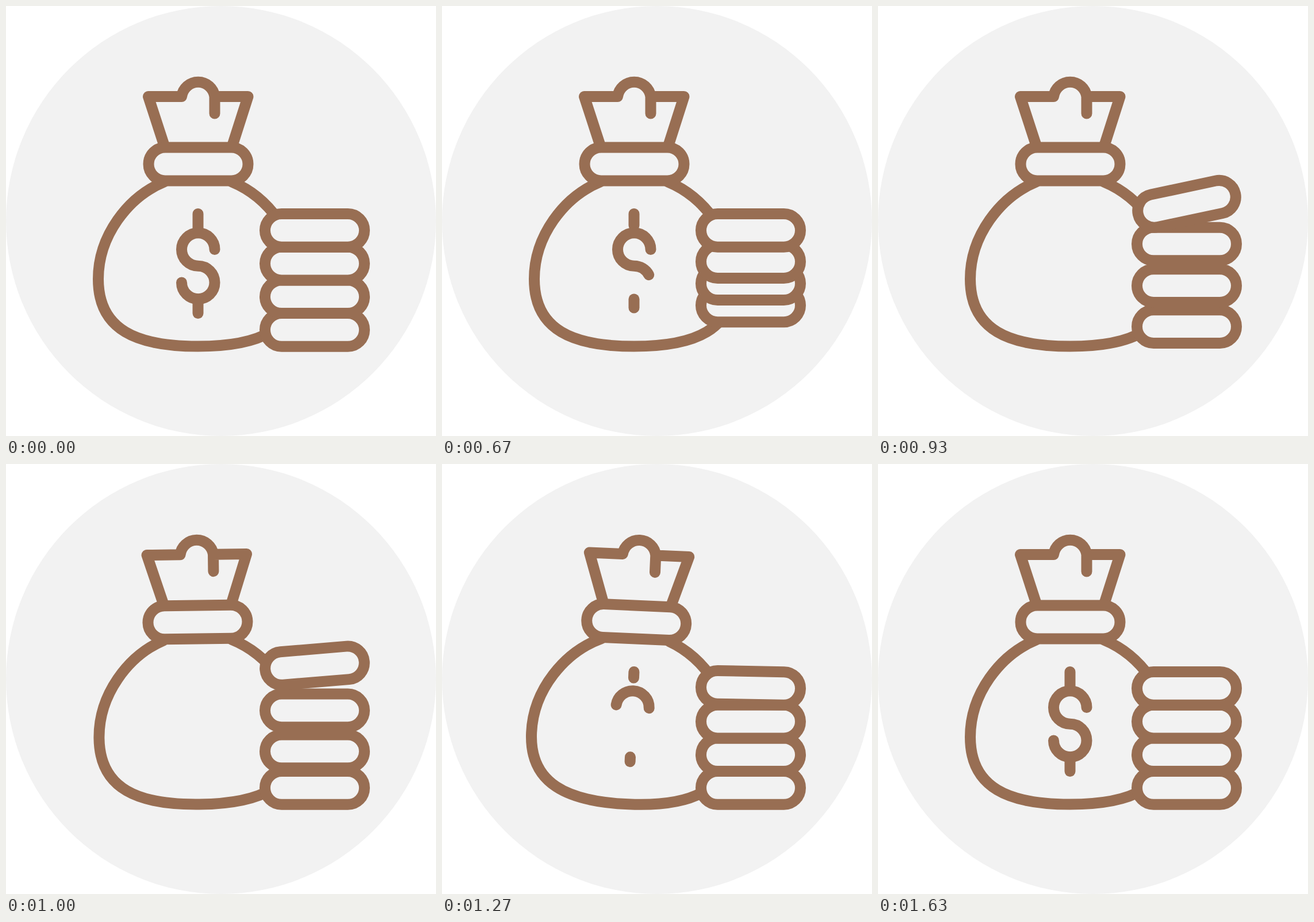
An HTML page that plays this animation: 748x748 px, repeating every 2.5 s.

```html
<!DOCTYPE html>
<html>
<head>
<meta charset="utf-8">
<style>
  html, body { margin: 0; width: 100%; height: 100%; overflow: hidden; background: #fff; }
  svg { display: block; width: 100vw; height: 100vh; }
  .line { fill: none; stroke: #986e53; stroke-width: 19; stroke-linecap: round; stroke-linejoin: round; }
  .disc, .solid { fill: #f2f2f2; }
</style>
</head>
<body>
<svg viewBox="0 0 748 748">
  <circle class="disc" cx="374" cy="374" r="374"/>
  <g class="line">
    <g id="bag">
      <path d="M275 306C212 332 160.500 400 160.500 475C160.500 564 228 592 334 592S507.500 564 507.500 475C507.500 400 456 332 393 306"/>
      <path d="M275 242L247.500 157.500H305.500A29 29 0 0 1 363 157.500V187M363 157.500H421L394 242"/>
      <rect class="solid" x="248" y="246" width="173" height="58" rx="29"/>
      <g id="dollar">
        <path pathLength="1" d="M334 361.500V394.500"/>
        <path pathLength="1" d="M363 423.500A28.750 28.750 0 1 0 334.250 452.250A28.750 28.750 0 1 1 305.500 481"/>
        <path pathLength="1" d="M334 510V534.500"/>
      </g>
    </g>
    <g id="coins"></g>
  </g>
</svg>
<script>
const LOOP = 2500, FRAME = 100 / 3;
const byId = id => document.getElementById(id);
const bag = byId('bag'), dollar = byId('dollar'), coinStack = byId('coins');

// Coins run from the bottom of the stack to the top.
const coins = [3, 2, 1, 0].map(row => {
  const coin = document.createElementNS('http://www.w3.org/2000/svg', 'rect');
  const attrs = { class: 'solid', x: 450.5, y: 361.5 + row * 57.7, width: 173, height: 57.7, rx: 28.85 };
  for (const name in attrs) coin.setAttribute(name, attrs[name]);
  return coinStack.appendChild(coin);
});

const linear = x => x;
const smooth = x => x * x * (3 - 2 * x);

// Value at time f along [time, value] keys.
function track(f, keys, ease = smooth) {
  if (f <= keys[0][0]) return keys[0][1];
  for (let i = 1; i < keys.length; i++) {
    const [a, from] = keys[i - 1], [b, to] = keys[i];
    if (f <= b) return from + (to - from) * ease((f - a) / (b - a));
  }
  return keys[keys.length - 1][1];
}

function draw(f) {
  const tilt = track(f, [[28, 0], [34, -2.7], [39, 3.1], [49, 0]]);
  bag.setAttribute('transform', `rotate(${tilt} 334 360)`);

  const drawn = track(f, [[15, 1], [28, 0], [32.8, 0], [49, 1]], linear);
  dollar.setAttribute('visibility', drawn > 0.001 ? 'visible' : 'hidden');
  dollar.setAttribute('stroke-dasharray', drawn < 1 ? `${drawn} 2` : 'none');

  coins.forEach((coin, i) => {
    const start = 15 + 2 * i, top = i === 3;
    const lift = track(f, [[start, 0], [start + 6, top ? -47 : -46], [start + (top ? 18 : 15), 0]]);
    const turn = top ? track(f, [[21, 0], [28, -12], [33.5, 12], [39, 0]]) : 0;
    coin.setAttribute('transform', `translate(0 ${lift}) rotate(${turn} 537 390.35)`);
  });
}

function tick() {
  // The motion advances in 30 steps per second.
  draw(Math.floor((performance.now() % LOOP + 4) / FRAME));
  requestAnimationFrame(tick);
}
tick();
</script>
</body>
</html>
```
